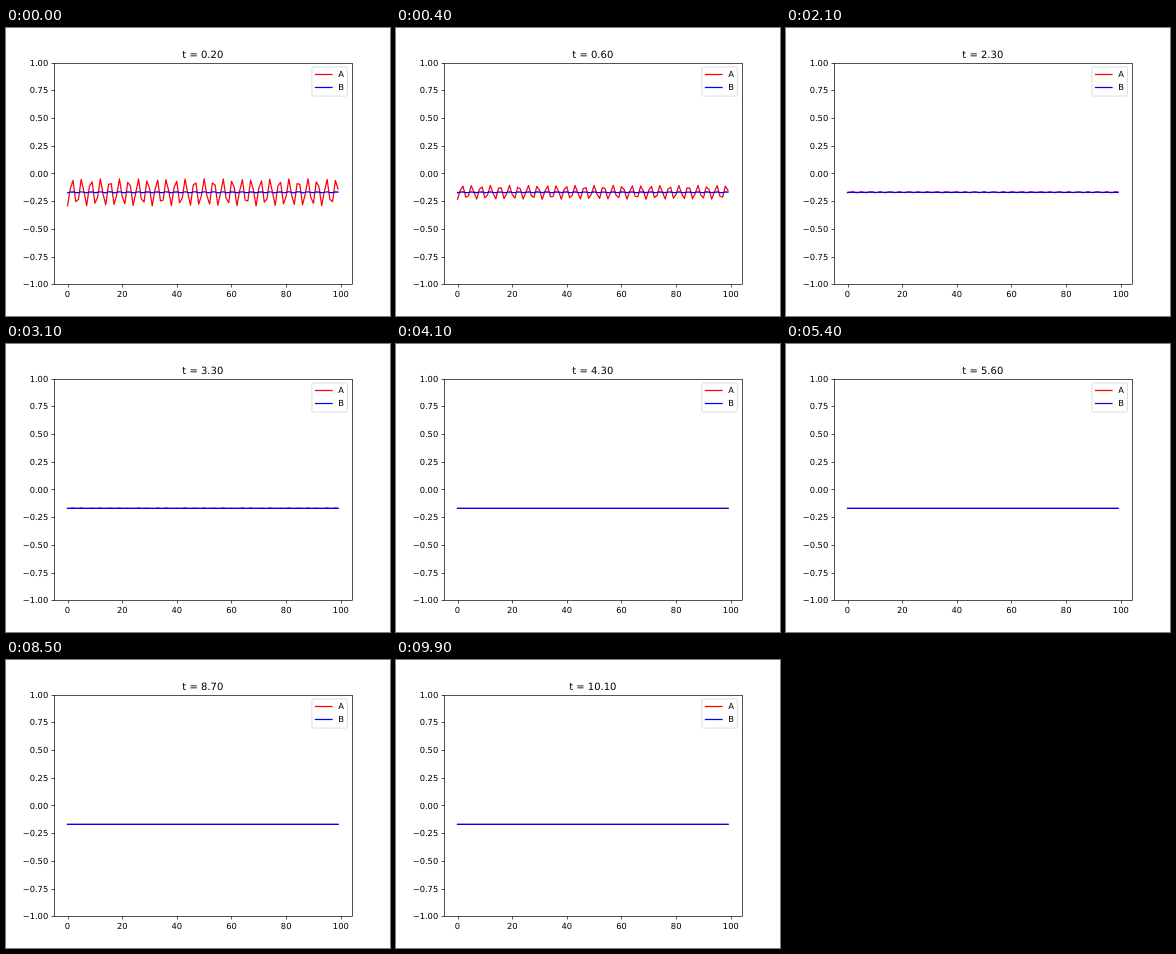
These frames come from a looping animation (384 by 288 pixels, 10000 ms). An HTML page:

```html
<!DOCTYPE html>
<html lang="en">
<head>
<meta charset="utf-8">
<title>Decay of A and B</title>
<style>
  html, body { margin: 0; width: 100%; height: 100%; overflow: hidden; background: #fff; }
  svg { display: block; width: 384px; height: 288px; }
  text { font-family: "DejaVu Sans", Verdana, sans-serif; font-size: 8.333px; text-rendering: geometricPrecision; }
  .title { font-size: 10px; }
  .axis { fill: none; stroke: #000; stroke-width: .667; }
  .curve { fill: none; stroke-width: 1.25; stroke-linecap: square; stroke-linejoin: round; }
  .a { stroke: #f00; }
  .b { stroke: #00f; }
</style>
</head>
<body>
<svg id="plot" viewBox="0 0 384 288"></svg>
<script>
const plot = document.getElementById('plot');
const LEFT = 48, RIGHT = 345.6, TOP = 34.56, BOTTOM = 256.32;
const STEP = 100, STEPS = 100;
const POINTS = 100, WAVES = 29, MEAN = -0.17;

const px = v => LEFT + (v + 4.95) / 108.9 * (RIGHT - LEFT);
const py = v => BOTTOM - (v + 1) / 2 * (BOTTOM - TOP);
const snap = v => Math.floor(v + 0.5) + 0.5;

function add(tag, attrs, text = '') {
  const el = document.createElementNS('http://www.w3.org/2000/svg', tag);
  for (const key in attrs) el.setAttribute(key, attrs[key]);
  el.textContent = text;
  plot.append(el);
  return el;
}

const curveA = add('path', { class: 'curve a' });
const curveB = add('path', { class: 'curve b' });

// Axes
const x0 = snap(LEFT), x1 = snap(RIGHT), y0 = snap(TOP), y1 = snap(BOTTOM);
add('rect', { class: 'axis', x: x0, y: y0, width: x1 - x0, height: y1 - y0 });
for (let v = 0; v <= 100; v += 20) {
  add('path', { class: 'axis', d: `M${snap(px(v))} ${y1}v3` });
  add('text', { x: px(v), y: 269, 'text-anchor': 'middle' }, v);
}
for (let v = -1; v <= 1; v += 0.25) {
  add('path', { class: 'axis', d: `M${x0} ${snap(py(v))}h-3` });
  add('text', { x: 42.2, y: py(v) + 3.1, 'text-anchor': 'end' }, v.toFixed(2).replace('-', '\u2212'));
}

// Legend
add('rect', {
  x: 305.9, y: 38.9, width: 35.5, height: 29.2, rx: 1.67,
  fill: '#fff', 'fill-opacity': 0.8, stroke: '#ccc', 'stroke-width': 0.83, 'stroke-opacity': 0.8
});
['A', 'B'].forEach((name, i) => {
  const y = 46.5 + 13 * i;
  add('path', { class: 'curve ' + name.toLowerCase(), d: `M309.5 ${y}h16.5` });
  add('text', { x: 332.3, y: y + 2.5 }, name);
});

const title = add('text', { class: 'title', x: 196.8, y: 30, 'text-anchor': 'middle' });

function wave(amp) {
  let d = '';
  for (let k = 0; k < POINTS; k++) {
    const v = MEAN - amp * Math.cos(2 * Math.PI * WAVES * k / POINTS);
    d += (k ? 'L' : 'M') + px(k).toFixed(2) + ' ' + py(v).toFixed(3);
  }
  return d;
}

let shown = -1;
function draw(now) {
  const step = Math.floor(now / STEP) % STEPS;
  if (step !== shown) {
    shown = step;
    const age = step / 10;
    title.textContent = 't = ' + (age + 0.2).toFixed(2);
    curveA.setAttribute('d', wave(0.122 * Math.exp(-1.66 * age)));
    curveB.setAttribute('d', wave(0.005 * Math.exp(-0.8 * age)));
  }
}

const start = performance.now();
function tick() {
  draw(performance.now() - start);
  requestAnimationFrame(tick);
}
tick();
</script>
</body>
</html>
```
